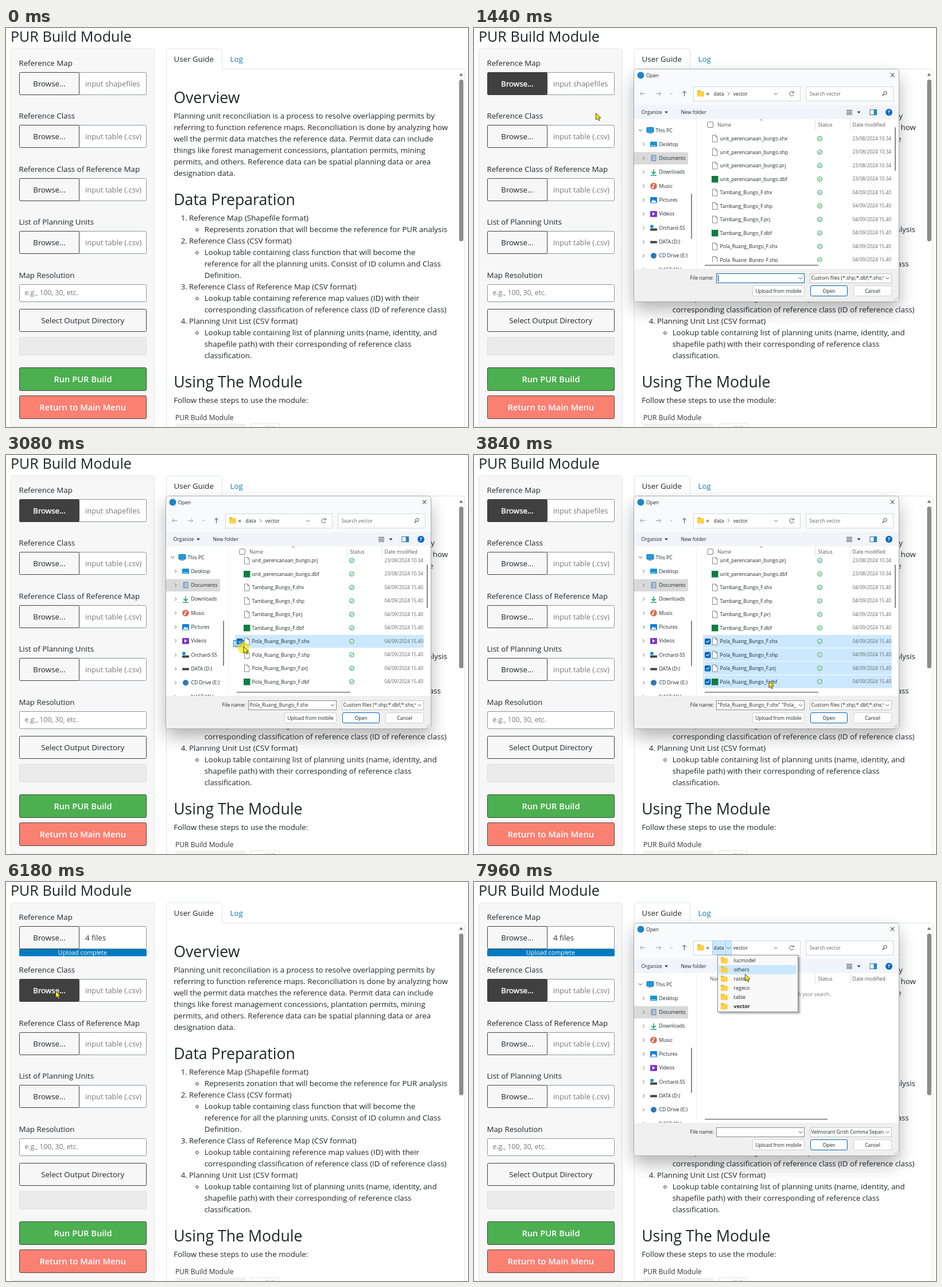
An HTML page for the animation above (8000 ms loop, 805 by 696 pixels).

```html
<!DOCTYPE html>
<html lang="en">
<head>
<meta charset="utf-8">
<title>PUR Build Module</title>
<style>
html, body { margin: 0; width: 100%; height: 100%; overflow: hidden; background: #fff; }
svg { display: block; width: 805px; height: 696px; font-family: 'Open Sans', 'Noto Sans', sans-serif; fill: #212529; }
</style>
</head>
<body>
<svg viewBox="0 0 805 696">
  <defs>
    <clipPath id="nav"><rect x="279" y="160" width="94" height="260"/></clipPath>
    <clipPath id="list"><rect x="388" y="178" width="340" height="230"/></clipPath>
    <clipPath id="name"><rect x="423" y="428" width="138" height="18"/></clipPath>
    <clipPath id="type"><rect x="586" y="428" width="128" height="18"/></clipPath>
  </defs>
  <g id="page"></g>
  <g id="live"></g>
</svg>
<script>
const LOOP = 8000, BODY = 13.33, HEADING = 26.67, SMALL = 8.65, PITCH = 23.5;

// y is the middle of the capitals
const text = (x, y, s, size = BODY, attrs = '') =>
  `<text x="${x}" y="${(y + size * .357).toFixed(2)}" font-size="${size}" ${attrs}>${s}</text>`;
const mid = (x, y, s, size, attrs = '') => text(x, y, s, size, 'text-anchor="middle" ' + attrs);
const rect = (x, y, w, h, fill, stroke = 'none', r = 0, attrs = '') =>
  `<rect x="${x}" y="${y}" width="${w}" height="${h}" rx="${r}" fill="${fill}" stroke="${stroke}" ${attrs}/>`;
const line = (d, stroke = '#555', w = 1, fill = 'none') =>
  `<path d="${d}" stroke="${stroke}" stroke-width="${w}" fill="${fill}"/>`;
const circle = (x, y, r, fill, stroke = 'none') =>
  `<circle cx="${x}" cy="${y}" r="${r}" fill="${fill}" stroke="${stroke}"/>`;
const chevron = (x, y) => line(`M${x - 3} ${y - 1.5}l3 3 3-3`);
const chevronRight = (x, y) => line(`M${x - 1.3} ${y - 2.8}l2.8 2.8-2.8 2.8`, '#666');
const triangle = (x, y) => line(`M${x - 3} ${y - 1.5}h6l-3 3.5z`, 'none', 0, '#333');
const clip = (id, s) => `<g clip-path="url(#${id})">${s}</g>`;

const clamp = v => Math.max(0, Math.min(1, v));
const ease = (t, a, b) => { const p = clamp((t - a) / (b - a)); return p * p * (3 - 2 * p); };
const within = (t, a, b) => t >= a && t < b;

function guide() {
  const left = 292.2;
  const paragraph = [
    'Planning unit reconciliation is a process to resolve overlapping permits by',
    'referring to function reference maps. Reconciliation is done by analyzing how',
    'well the permit data matches the reference data. Permit data can include',
    'things like forest management concessions, plantation permits, mining',
    'permits, and others. Reference data can be spatial planning data or area',
    'designation data.'];
  const items = [
    ['Reference Map (Shapefile format)',
      'Represents zonation that will become the reference for PUR analysis'],
    ['Reference Class (CSV format)',
      'Lookup table containing class function that will become the',
      'reference for all the planning units. Consist of ID column and Class', 'Definition.'],
    ['Reference Class of Reference Map (CSV format)',
      'Lookup table containing reference map values (ID) with their',
      'corresponding classification of reference class (ID of reference class)'],
    ['Planning Unit List (CSV format)',
      'Lookup table containing list of planning units (name, identity, and',
      'shapefile path) with their corresponding of reference class', 'classification.']];
  let s = text(left, 121, 'Overview', HEADING) + text(left, 299, 'Data Preparation', HEADING)
    + text(left, 617.5, 'Using The Module', HEADING)
    + paragraph.map((p, i) => text(left, 153.5 + i * 19.95, p)).join('');
  let y = 331.5;
  items.forEach(([head, ...lines], i) => {
    s += text(315.8, y, i + 1 + '.', BODY, 'text-anchor="end"') + text(319, y, head)
      + circle(333, y + 20.5, 2.3, 'none', '#212529');
    y += 20;
    lines.forEach(l => { s += text(345.7, y, l); y += 20; });
  });
  return s + text(left, 649.5, 'Follow these steps to use the module:')
    + text(295, 679.5, 'PUR Build Module', 12.1, 'fill="#333"')
    + rect(295, 690, 122, 10, '#f2f2f2') + rect(426.5, 690.5, 50, 10, '#fff', '#e3e3e3')
    + line('M452 695h7M462 695h7', '#ccc');
}

function page() {
  const labels = ['Reference Map', 'Reference Class', 'Reference Class of Reference Map',
    'List of Planning Units', 'Map Resolution'];
  return text(7.9, 15.5, 'PUR Build Module', 25.15)
    + rect(8.5, 36.5, 250, 659, '#f7f7f7', '#e3e3e3', 3)
    + labels.map((l, i) => text(22.4, 61 + i * 92.5, l)).join('')
    + rect(23.5, 447.5, 221, 30, '#fff', '#8d959e', 2)
    + text(32.4, 462, 'e.g., 100, 30, etc.', 12.2, 'fill="#777"')
    + rect(23.5, 490.5, 221, 39, '#f7f7f7', '#404040', 2) + mid(133.7, 510, 'Select Output Directory')
    + rect(23.5, 539.5, 221, 31, '#ebebeb', '#dedede', 2)
    + rect(23.5, 592.5, 221, 40, '#4caf50', '#3b4a3c', 2)
    + mid(134, 612.5, 'Run PUR Build', 14.67, 'fill="#fff" font-weight="600"')
    + rect(23.5, 641.5, 221, 40, '#fa8072', '#5a4440', 2)
    + mid(133.7, 662, 'Return to Main Menu', 14.67, 'fill="#fff" font-weight="600"')
    + line('M279.5 696V74.5Q279.5 71.5 282 71.5H796Q799.5 71.5 799.5 75V696', '#dee2e6')
    + line('M279.5 72V39.5Q279.5 36.5 282.5 36.5H373Q376.5 36.5 376.5 39.5V72', '#dee2e6', 1, '#fff')
    + text(292.6, 54, 'User Guide') + text(390.5, 54, 'Log', BODY, 'fill="#0f7abf"')
    + rect(789.5, 90, 7.5, 282, '#8c8c8c', 'none', 3.5) + line('M789.5 83.5h7l-3.5-5z', 'none', 0, '#777')
    + guide();
}

function uploads(t) {
  const active = within(t, 700, 5250) ? 0 : t >= 6080 ? 1 : -1;
  let s = '';
  for (let i = 0; i < 4; i++) {
    const y = 77.5 + Math.round(i * 92.4), on = i === active, done = i === 0 && t >= 5340;
    s += rect(23.5, y, 221, 39, '#fff', '#8d959e', 2)
      + rect(23.5, y, 104, 39, on ? '#404040' : '#f7f7f7', '#404040', 2)
      + mid(75.5, y + 19.5, 'Browse...', BODY, on ? 'fill="#fff" stroke="#fff" stroke-width=".45"' : '')
      + text(138, y + 19.5, done ? '4 files' : i ? 'input table (.csv)' : 'input shapefiles',
        done ? BODY : 12.9, `fill="${done ? '#333' : '#777'}"`);
  }
  s += rect(23, 117, 222 * ease(t, 5360, 5560), 12.5, '#007bc2', 'none', 1.5);
  if (t >= 5560) s += mid(133.5, 123, 'Upload complete', 10.7, 'fill="#fff"');
  return s;
}

const folder = (x, y) => rect(x - 6, y - 5, 6, 4, '#e6a100', 'none', 1) + rect(x - 6, y - 3.5, 12, 9, '#ffcf48', 'none', 1);
const checkbox = (x, y, on) => rect(x - 4.5, y - 4.5, 9.5, 9.5, on ? '#0067c0' : '#fff', on ? '#0067c0' : '#777', 1.5)
  + (on ? line(`M${x - 2.3} ${y}l2 2 3.5-4`, '#fff', 1.1) : '');

const navIcons = [
  (x, y) => rect(x - 6, y - 5, 12, 8.5, '#1e9be0', '#1873a8', 1) + rect(x - 3, y + 4.5, 6, 1.2, '#789'),
  (x, y) => rect(x - 6, y - 4.5, 12, 9, '#1593d6', 'none', 1) + rect(x - 4.5, y + 2, 8, 1.3, '#bfe6fa'),
  (x, y) => rect(x - 4.5, y - 5.5, 9, 11, '#7e9fc2', 'none', 1) + line(`M${x - 2} ${y - 2.5}h5m-5 2.5h5m-5 2.5h5`, '#fff'),
  (x, y) => line(`M${x} ${y - 5}v8m-3.5-3.5l3.5 3.5 3.5-3.5M${x - 5} ${y + 5.5}h10`, '#15a06e', 1.5),
  (x, y) => circle(x, y, 5.8, '#d9694f') + line(`M${x - .5} ${y + 2}v-5l2.5 1`, '#fff', 1.2) + circle(x - 1.6, y + 2, 1.5, '#fff'),
  (x, y) => rect(x - 6, y - 5, 12, 10.5, '#1580d8', 'none', 1) + line(`M${x - 5} ${y + 4.5}l4-5 2 2 1.5-1 2.5 4z`, 'none', 0, '#fff'),
  (x, y) => rect(x - 6, y - 5, 12, 10.5, '#7a35c4', 'none', 1) + line(`M${x - 2} ${y - 3}l4.5 3-4.5 3z`, 'none', 0, '#fff'),
  (x, y) => rect(x - 5.5, y - 5, 5, 5, '#0a84d8') + rect(x - 6, y + 1, 12, 4, '#444'),
  (x, y) => rect(x - 6, y - 1.5, 12, 4, '#444', 'none', 1),
  (x, y) => circle(x, y, 5, '#2b78b8'),
  (x, y) => rect(x - 6, y - 1.5, 12, 4, '#444', 'none', 1)];

function navPane() {
  const names = ['This PC', 'Desktop', 'Documents', 'Downloads', 'Music', 'Pictures', 'Videos',
    'Orchard-SS', 'DATA (D:)', 'CD Drive (E:)', 'NAS7 (W:)'];
  return clip('nav', rect(279, 216.5, 94, 21.5, '#d9d9d9') + names.map((n, i) => {
    const y = 178.5 + i * 24.3;
    return (i ? chevronRight(295.5, y) : chevron(290, y)) + navIcons[i](i ? 313 : 307, y)
      + text(i ? 322.5 : 316.5, y, n, SMALL);
  }).join('')) + rect(378, 289, 2, 79, '#888', 'none', 1);
}

const files = ['unit_perencanaan_bungo', 'Tambang_Bungo_F', 'Pola_Ruang_Bungo_F', 'podes_jambi']
  .flatMap((n, g) => ['shx', 'shp', 'prj', 'dbf'].map(ext => ({
    name: n + '.' + ext, table: ext === 'dbf',
    date: g % 3 ? '04/09/2024 15.40' : '23/08/2024 10.34' })));

const scrollAt = t => 56 * ease(t, 1780, 2060) + 70.5 * ease(t, 3960, 4110);
const DRAG = { from: 2900, to: 3650, x: 396, y: 323 };

function selectedCount(t, p) {
  if (t < DRAG.from + 60) return 0;
  return t >= DRAG.to ? 4 : Math.max(0, Math.min(4, Math.floor((p.y - 313.5) / PITCH) + 1));
}

function fileList(t, p) {
  const offset = scrollAt(t), count = selectedCount(t, p), dragging = within(t, DRAG.from, DRAG.to);
  let s = '';
  files.forEach((f, i) => {
    const y = 193 + i * PITCH - offset, top = y - PITCH / 2;
    if (y < 165 || y > 420) return;
    const chosen = i >= 8 && i < 8 + count;
    const hover = !dragging && p.x > 399 && p.x < 728 && p.y < 408 && p.y >= top && p.y < top + PITCH;
    if (chosen || hover)
      s += rect(399, top + .5, 330, PITCH - 1, chosen ? (t > 5040 ? '#d9d9d9' : '#cce8ff') : '#e5f3ff') + checkbox(407, y, chosen);
    s += (f.table ? rect(414, y - 5.5, 11.5, 11.5, '#107c41')
      : line(`M415.5 ${y - 6}h5.5l3 3v9h-8.5zM421 ${y - 6}v3h3`, '#777', .9, '#fff'))
      + text(428.6, y, f.name, 8.6) + circle(602.5, y, 3.9, '#fff', '#16994a')
      + line(`M600.5 ${y}l1.5 1.6 2.6-3`, '#16994a')
      + text(659.6, y, f.date, 8.3, 'fill="#666"');
  });
  if (dragging)
    s += rect(DRAG.x + .5, DRAG.y + .5, Math.max(0, p.x - DRAG.x), Math.max(0, p.y - DRAG.y), '#0078d733', '#0078d7');
  return clip('list', s) + rect(733, 173 + offset * .32, 2, 76, '#888', 'none', 1) + rect(402, 413, 198, 1.5, '#777');
}

function dropdown(p) {
  const names = ['lucmodel', 'others', 'raster', 'regeco', 'table', 'vector'];
  return rect(427, 130, 141, 99.5, '#0005', 'none', 0, 'style="filter:blur(1.5px)"')
    + rect(424.5, 127.5, 140, 99, '#f9f9f9', '#8a8a8a')
    + names.map((n, i) => {
      const y = 137 + i * 16;
      return (p.y >= y - 8 && p.y < y + 8 ? rect(426, y - 8, 136, 16, '#cce8ff') : '')
        + folder(436, y - .5) + text(452.6, y, n, 8.9, i === 5 ? 'font-weight="700"' : '');
    }).join('');
}

function dialog(t, p, second) {
  const opacity = second ? ease(t, 6560, 6720) : ease(t, 1150, 1290);
  const menu = second && t >= 7680, count = second ? 0 : selectedCount(t, p);
  const focused = second ? !menu : t < DRAG.from;
  const overOpen = p.x > 586 && p.x < 651 && p.y > 449 && p.y < 468;
  const name = count > 1 ? '"Pola_Ruang_Bungo_F.shx" "Pola_Ruang_Bungo_F.shp"' : count ? 'Pola_Ruang_Bungo_F.shx' : '';
  const button = (x, w, label, stroke, fill = '#fdfdfd') =>
    rect(x + .5, 449.5, w, 18, fill, stroke, 2.5) + mid(x + w / 2 + .5, 458.5, label, SMALL);
  return `<g opacity="${opacity}">`
    + rect(279, 86, 461, 405, '#000', 'none', 6, 'opacity=".3" style="filter:blur(15px)"')
    + rect(278.5, 71.5, 462, 406, '#fff', '#a5a9ad', 5)
    + rect(279, 72, 461, 64, '#f9fafc', 'none', 5) + rect(279, 134, 461, 25, '#f1f4f9')
    + rect(279, 420, 461, 57, '#f0f0f0', 'none', 4)
    + circle(290.5, 82.5, 6, '#1b86c8') + text(300, 82.5, 'Open', SMALL)
    + line('M725.5 78.5l7 7m0-7l-7 7', '#222')
    + line('M298.5 114.5h-9m3.5-3.5l-3.5 3.5 3.5 3.5M316.5 114.5h9m-3.5-3.5l3.5 3.5-3.5 3.5M342 113.5l2 2 2-2', '#999')
    + line('M366.5 119v-9m-3.5 3.5l3.5-3.5 3.5 3.5', '#444')
    + rect(382.5, 102.5, 186, 25, '#fff', '#d2d5d9') + folder(395, 114) + text(404.5, 114, '«', 11)
    + (menu ? rect(415.5, 102.5, 33, 24.5, '#cce8ff', '#99d1ff') + line('M438.5 103v24', '#99d1ff') : '')
    + text(417.6, 114.5, 'data', SMALL) + (menu ? chevron(443.5, 115) : chevronRight(443.5, 114.5))
    + text(451.8, 114.5, 'vector', SMALL) + chevron(526, 115)
    + line('M557 113a3.8 3.8 0 1 0 .2 3m0-5.5v2.7h-2.7')
    + rect(578.5, 102.5, 152, 25, '#fff', '#d2d5d9') + text(584.5, 114.5, 'Search vector', SMALL, 'fill="#666"')
    + circle(716.5, 113.3, 2.8, 'none', '#444') + line('M714.5 115.5l-3 3', '#444', 1.2)
    + text(291.6, 147, 'Organize', SMALL) + triangle(335, 147) + text(360.6, 147, 'New folder', SMALL)
    + line('M649 143.5h10m-10 2.5h10m-10 2.5h10m-10 2.5h10', '#444') + triangle(670.5, 147)
    + rect(690, 142.5, 11.5, 9, '#fff', '#3b6f9e') + rect(696.5, 143, 5, 8, '#1a8ad4')
    + circle(723, 147, 6, '#0a69bd') + mid(723, 147, '?', 9, 'fill="#fff" font-weight="700"')
    + navPane() + line('M387.5 160V420', '#f0f0f0') + line('M594.5 159v19M655.5 159v19', '#e2e2e2')
    + line('M498 161.5l2.5-2 2.5 2', '#777')
    + (second ? '' : checkbox(411.5, 168.5, false)) + text(second ? 411 : 424, 169, 'Name', SMALL, 'fill="#555"')
    + text(599.5, 169, 'Status', SMALL, 'fill="#555"') + text(659.6, 169, 'Date modified', SMALL, 'fill="#555"')
    + (second ? mid(564, 196, 'No items match your search.', SMALL, 'fill="#777"') + rect(402, 413, 214, 1.5, '#777')
      : fileList(t, p))
    + text(376.6, 436, 'File name:', SMALL)
    + rect(422.5, 428.5, 153, 16, '#fff', focused ? '#0067c0' : '#888') + chevron(569, 436.5)
    + clip('name', text(424.5, 436, name, 8.75)) + (focused ? line('M425.5 431v11', '#111') : '')
    + rect(585.5, 428.5, 142, 16, '#fdfdfd', '#c4c4c4') + chevron(720.5, 436.5)
    + clip('type', text(587.5, 436, second ? 'Velmorant Grish Comma Separated' : 'Custom files (*.shp;*.dbf;*.shx;*.prj)', SMALL))
    + button(485, 90, 'Upload from mobile', '#d0d0d0')
    + button(586, 64, 'Open', '#0067c0', overOpen ? '#cce4f7' : '#fdfdfd') + button(661, 66, 'Cancel', '#d0d0d0')
    + line('M732 475.5l6-6M735.5 475.5l2.5-2.5', '#aaa')
    + (menu ? dropdown(p) : '') + '</g>';
}

// time, x, y of the pointer tip
const path = [[70, 765, 685], [780, 59, 98], [1150, 59, 98], [1440, 212, 148], [1650, 418, 330], [1760, 421, 341],
  [2480, 421, 341], [2800, 396, 323], [2900, 396, 323], [3640, 513.5, 394], [3860, 513.5, 394], [4060, 517, 380],
  [4200, 520, 378], [4920, 628, 455], [5260, 628, 455], [6120, 86, 190], [6420, 86, 190], [6660, 400, 165],
  [7300, 442, 117], [7700, 442, 117], [7950, 472, 160.5], [8000, 472, 160.5]];

function pointerAt(t) {
  const i = Math.max(1, path.findIndex(k => k[0] >= t));
  const [a, x0, y0] = path[i - 1], [b, x1, y1] = path[i], p = ease(t, a, b);
  return { x: x0 + (x1 - x0) * p, y: y0 + (y1 - y0) * p };
}

const clicks = [[930, 1070], [2880, DRAG.to], [5050, 5230], [6260, 6390], [7610, 7700]];

function pointer(t, p) {
  if (t < 70) return '';
  const halo = clicks.some(([a, b]) => within(t, a, b)) ? circle(0, 2.5, 10.5, '#ffe000a0') : '';
  return `<g transform="translate(${p.x.toFixed(2)} ${p.y.toFixed(2)})">${halo}`
    + line('M.5.5V12L3.2 9.6 5.2 13.6 7.2 12.7 5.4 8.8H9z', '#333', .9, '#fff200') + '</g>';
}

const live = document.getElementById('live');
document.getElementById('page').innerHTML = page();
let shown = '';

function draw() {
  const t = performance.now() % LOOP, p = pointerAt(t);
  let s = uploads(t);
  if (within(t, 1150, 5250)) s += dialog(t, p, false);
  if (t >= 6560) s += dialog(t, p, true);
  s += pointer(t, p);
  if (s !== shown) live.innerHTML = shown = s;
  requestAnimationFrame(draw);
}
draw();
</script>
</body>
</html>
```
